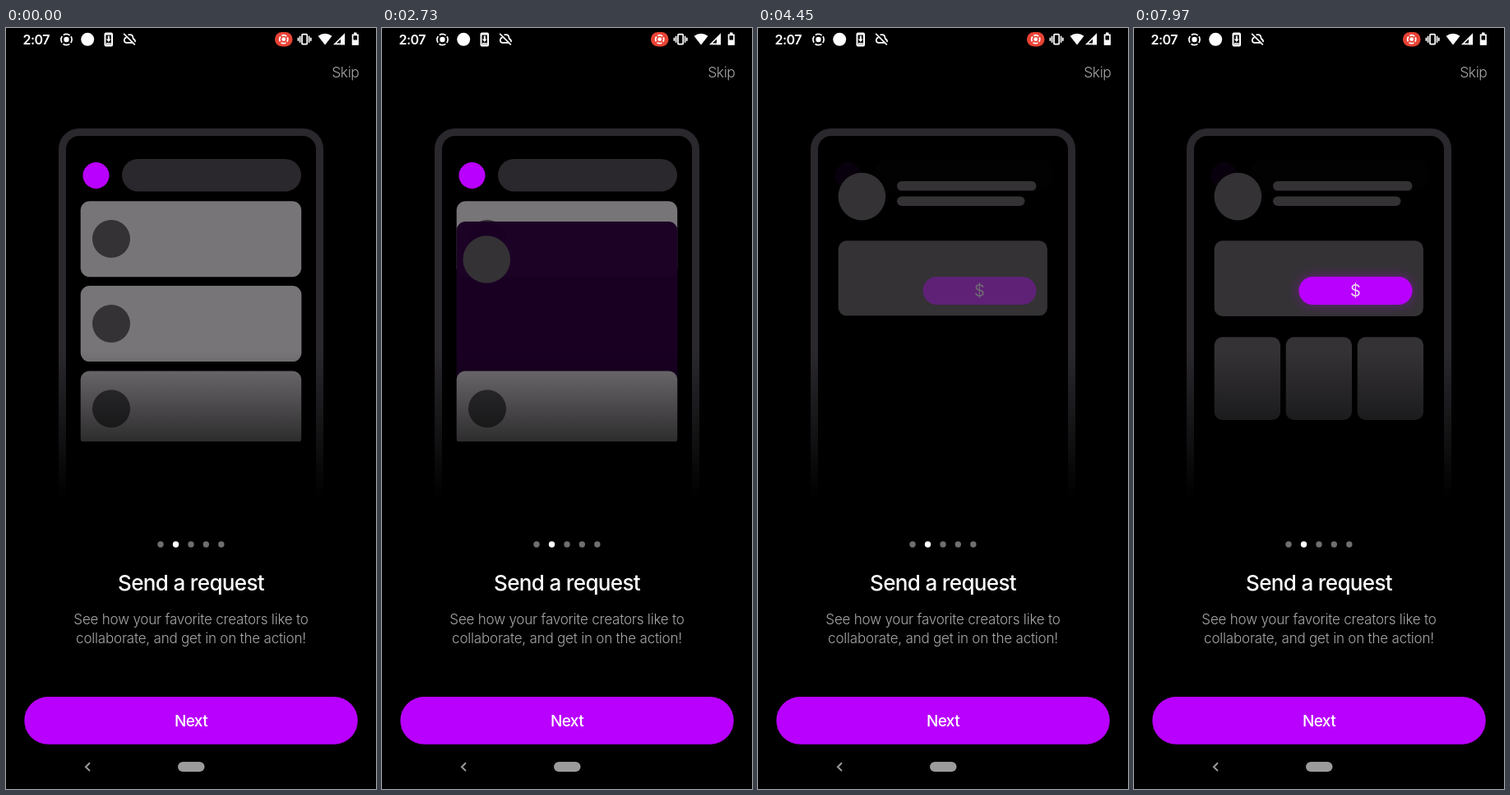
An HTML page that plays this animation: 450 px wide and 924 px high, repeating every 8 s.

```html
<!DOCTYPE html>
<html lang="en">
<head>
<meta charset="utf-8">
<title>Onboarding</title>
<style>
  html, body { margin: 0; width: 100%; height: 100%; overflow: hidden; background: #000; }
  svg { display: block; width: 100%; height: 100%; }
  text { font-family: Inter, Roboto, sans-serif; }
  .body { font-size: 17px; font-weight: 300; letter-spacing: -.2px; fill: #a8a6a8; }
  .line { fill: none; stroke: #fff; stroke-width: 1.7; }
</style>
</head>
<body>
<svg viewBox="0 0 450 924">
  <defs>
    <linearGradient id="fade" x1="0" y1="0" x2="0" y2="1">
      <stop offset="0" stop-opacity="0"/>
      <stop offset="1"/>
    </linearGradient>
    <clipPath id="list"><rect x="73" y="140" width="304" height="362"/></clipPath>
    <filter id="blur" x="-20%" y="-60%" width="140%" height="220%">
      <feGaussianBlur stdDeviation="7"/>
    </filter>
  </defs>
  <rect width="450" height="924"/>

  <!-- status bar -->
  <text x="20.5" y="19.5" font-size="16" font-weight="600" letter-spacing="-.5" fill="#fff">2:07</text>
  <g fill="#fff">
    <circle class="line" cx="73.5" cy="14" r="6.6" stroke-dasharray="8.4 1.97" stroke-dashoffset="4.2"/>
    <circle cx="73.5" cy="14" r="3.2"/>
    <circle cx="99.2" cy="13.8" r="8"/>
    <rect x="119.5" y="5.5" width="10.5" height="17" rx="2"/>
    <path d="M121.5 8.5h6.5v11h-6.5z" fill="#000"/>
    <path d="M123.8 9.5h2v4h2l-3 3.5-3-3.5h2zM122 18h5.6v1.2H122z"/>
    <path class="line" d="M143.2 6.8l13.6 13.6M148.6 8.2h2.6q2.4 0 3 2.6l.8 2.6q2.4 1 2 3.6M146.4 11.6q-2.6.6-2.6 3.4t2.8 2.9h7" stroke-width="1.5"/>
    <rect x="327" y="5" width="21.5" height="17.5" rx="8.5" fill="#e94235"/>
    <circle class="line" cx="337.7" cy="13.7" r="5" stroke-width="1.3" stroke-dasharray="6.3 1.55" stroke-dashoffset="3.1"/>
    <circle cx="337.7" cy="13.7" r="2.4"/>
    <rect class="line" x="360" y="7.7" width="6.2" height="12" rx="1"/>
    <path class="line" d="M357.6 9.8v8M355.4 11.8v4M368.6 9.8v8M370.8 11.8v4" stroke-width="1.3"/>
    <path d="M379.5 9.8Q388 3.5 396.5 9.8L388 20.5z"/>
    <path class="line" d="M411.2 8.2v11.2H400z"/>
    <path d="M407 12.4l5-5v12.8h-5z"/>
    <path class="line" d="M421.6 8.3h6.4v11.6h-6.4z"/>
    <path d="M423 5.6h3.6V8H423zM421 14.5h7.5v6H421z"/>
  </g>
  <text x="429.5" y="60" text-anchor="end" font-size="17.5" font-weight="300" letter-spacing="-.4" fill="#a8a6a8">Skip</text>

  <!-- phone mock-up -->
  <path d="M68.5 572V147a20.5 20.5 0 0 1 20.5-20.5h272a20.5 20.5 0 0 1 20.5 20.5v425" fill="none" stroke="#2a282d" stroke-width="9"/>
  <circle cx="109.5" cy="179" r="16" fill="#b900ff"/>
  <rect x="141" y="159" width="218" height="39.5" rx="19.75" fill="#2a282d"/>
  <g clip-path="url(#list)">
    <g id="first">
      <rect x="90.7" y="210.2" width="268.5" height="92" rx="11" fill="#787578"/>
      <circle cx="128" cy="256" r="23" fill="#343235"/>
    </g>
    <rect id="card" x="90.7" width="268.7" rx="11"/>
    <g id="third">
      <rect x="90.7" y="416.4" width="268.5" height="92" rx="11" fill="#787578"/>
      <circle cx="128" cy="462.3" r="23" fill="#343235"/>
    </g>
  </g>
  <g fill="#343235">
    <circle id="avatar"/>
    <rect id="line1" x="169" y="186" height="11.6" rx="5.8"/>
    <rect id="line2" x="169" y="204.4" height="11.6" rx="5.8"/>
    <rect id="panel" x="97.7" y="258.2" width="254.2" rx="10"/>
    <g id="boxes">
      <rect x="97.7" y="375.3" width="80.3" rx="10"/>
      <rect x="184.7" y="375.3" width="80.3" rx="10"/>
      <rect x="271.7" y="375.3" width="80.3" rx="10"/>
    </g>
  </g>
  <g id="pay">
    <rect id="glow" x="200.5" y="302" width="138" height="34" rx="17" fill="#b900ff" filter="url(#blur)"/>
    <rect x="200.5" y="302" width="138" height="34" rx="17" fill="#b900ff"/>
    <text x="269.5" y="326.3" text-anchor="middle" font-size="20" font-weight="400" fill="#ead8f0">$</text>
  </g>
  <rect x="60" y="392" width="330" height="178" fill="url(#fade)"/>
  <rect x="60" y="570" width="330" height="10"/>

  <!-- copy and controls -->
  <g fill="#706e71">
    <circle cx="188" cy="627" r="3.7"/>
    <circle cx="206.5" cy="627" r="3.7" fill="#fff"/>
    <circle cx="225" cy="627" r="3.7"/>
    <circle cx="243.3" cy="627" r="3.7"/>
    <circle cx="261.8" cy="627" r="3.7"/>
  </g>
  <g text-anchor="middle">
    <text x="225" y="683" font-size="26" font-weight="500" letter-spacing="-.65" fill="#fff">Send a request</text>
    <text class="body" x="225" y="724">See how your favorite creators like to</text>
    <text class="body" x="225" y="747">collaborate, and get in on the action!</text>
    <rect x="22.3" y="812" width="405.5" height="57.7" rx="28.85" fill="#b900ff"/>
    <text x="225" y="848" font-size="19" font-weight="500" letter-spacing="-.6" fill="#fff">Next</text>
  </g>
  <path d="M102 892.3l-5 4.9 5 4.9" fill="none" stroke="#9b9b9b" stroke-width="2"/>
  <rect x="209" y="891" width="32.5" height="12" rx="6" fill="#9b9b9b"/>
</svg>
<script>
const LOOP = 8000;
const GRAY = [120, 117, 120], PURPLE = [185, 0, 255], BLACK = [0, 0, 0];
const $ = id => document.getElementById(id);
const mix = (a, b, p) => a + (b - a) * p;
const mixColor = (a, b, p) => a.map((v, i) => mix(v, b[i], p));
const ramp = (t, from, to) => Math.min(1, Math.max(0, (t - from) / (to - from)));
const ease = (t, from, to) => { const p = ramp(t, from, to); return p * p * (3 - 2 * p); };
const easeOut = (t, from, to) => 1 - (1 - ramp(t, from, to)) ** 2;

function set(el, attrs) {
  for (const key in attrs) el.setAttribute(key, attrs[key]);
}

function draw(t) {
  // the chosen card lights up, rises and darkens into the detail page
  const rise = ease(t, 2436, 3022);
  const top = mix(313.1, 158.7, rise);
  const grow = ease(t, 2290, 2700);
  const lit = mixColor(GRAY, PURPLE, ease(t, 330, 860));
  const color = mixColor(lit, BLACK, ease(t, 2391, 2836));
  set($('card'), {
    y: top,
    height: mix(92, 345, grow),
    fill: `rgb(${color.map(Math.round)})`,
    opacity: mix(1, .95, rise)
  });
  const radius = mix(23, 28.8, grow);
  set($('avatar'), { cx: mix(105, 97.6, ease(t, 2437, 2812)) + radius, cy: top + 45.9, r: radius });
  const others = 1 - ease(t, 2760, 3060);
  set($('first'), { opacity: others });
  set($('third'), { opacity: others });

  // detail page builds up
  set($('line1'), { width: 169.5 * easeOut(t, 3090, 3500) });
  set($('line2'), { width: 155.5 * easeOut(t, 3300, 3730) });
  set($('panel'), { height: 91.8 * easeOut(t, 3910, 4500) });
  set($('pay'), { opacity: ease(t, 4300, 4700) });
  for (const box of $('boxes').children) set(box, { height: 100.7 * easeOut(t, 4730, 5500) });

  const pulse = ease(t, 5550, 6150) - ease(t, 6360, 7120) + ease(t, 7300, 7970);
  set($('glow'), { opacity: .4 * pulse });
}

function tick() {
  draw(performance.now() % LOOP);
  requestAnimationFrame(tick);
}
tick();
</script>
</body>
</html>
```
